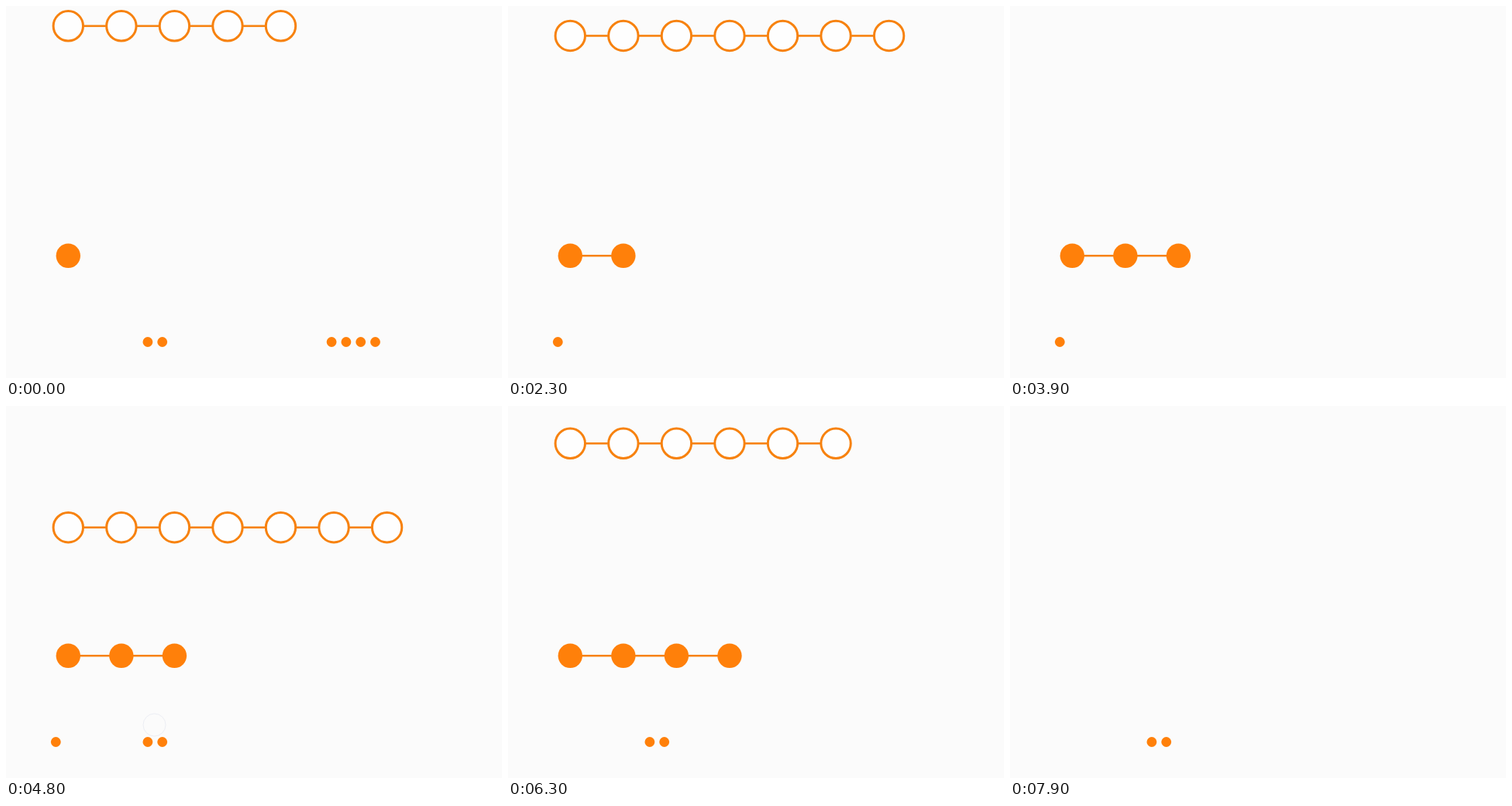
These frames come from a looping animation (640 px wide and 480 px high, 8000 ms). An HTML page with a canvas:

```html
<!DOCTYPE html>
<html lang="en">
<head>
<meta charset="utf-8">
<title>Falling rings</title>
<style>
  html, body { margin: 0; width: 100%; height: 100%; overflow: hidden; background: #fbfbfb; }
  canvas { display: block; }
</style>
</head>
<body>
<canvas id="stage" width="640" height="480"></canvas>
<script>
const ctx = document.getElementById('stage').getContext('2d');
const LOOP = 8000, STEP = 100;
const ORANGE = '#ff800a', RING = '#f7820f', PAPER = '#fbfbfb';
const FLOOR_Y = 322.3, DOT_Y = 433.5, SPEED = 0.2525;
const FLIGHT = 415, FADE = 450;

// Each row passes height y at time t; a shot removes rings from its right end.
const rows = [
  { count: 5, t: 1300, y: 320, land: 1309 },
  { count: 7, t: 3000, y: 215.2, land: 3424, shot: { at: 2700, size: 1 } },
  { count: 7, t: 4800, y: 156.7, land: 5455, shot: { at: 4850, size: 2 } },
  { count: 6, t: 6300, y: 48.3, land: 7385, shot: { at: 6550, size: 2 }, clears: true }
];

const choices = [
  { until: 2100, sizes: [2, 4] },
  { until: 4100, sizes: [1] },
  { until: 6000, sizes: [1, 2] },
  { until: LOOP, sizes: [2] }
];

const clamp = v => Math.max(0, Math.min(1, v));
const mix = (a, b, p) => a + (b - a) * p;
const slotX = i => 80.3 + i * 68.55;
const dotX = (size, i) => 64.3 + (size - 1) * 128 + (i - (size - 1) / 2) * 18.8;

function circle(x, y, r) {
  ctx.beginPath();
  ctx.arc(x, y, r, 0, Math.PI * 2);
}

function disc(x, y, r) {
  circle(x, y, r);
  ctx.fillStyle = ORANGE;
  ctx.fill();
}

function link(i, y, gap) {
  ctx.beginPath();
  ctx.moveTo(slotX(i - 1) + gap, y);
  ctx.lineTo(slotX(i) - gap, y);
  ctx.strokeStyle = RING;
  ctx.lineWidth = 2.6;
  ctx.stroke();
}

function rowY(row, t) {
  if (row === rows[0]) {
    return t < 900 ? mix(25.8, 222, t / 900) : Math.min(FLOOR_Y, mix(222, 320, (t - 900) / 400));
  }
  return Math.min(FLOOR_Y, row.y + (t - row.t) * SPEED);
}

function drawRow(row, t) {
  const y = rowY(row, t);
  const fade = row.clears ? clamp((7700 - t) / 300) : 1 - clamp((t - row.land) / FADE);
  if (y < -22 || fade === 0) return;
  const hit = row.shot && t >= row.shot.at + FLIGHT;
  const count = row.count - (hit ? row.shot.size : 0);
  ctx.globalAlpha = fade;
  for (let i = 0; i < count; i++) {
    if (i) link(i, y, 20);
    circle(slotX(i), y, 19.2);
    ctx.fillStyle = '#fefefe';
    ctx.fill();
    ctx.strokeStyle = RING;
    ctx.lineWidth = 3;
    ctx.stroke();
  }
  ctx.globalAlpha = 1;
}

function drawShot(row, t) {
  if (!row.shot) return;
  const { at, size } = row.shot;
  const p = (t - at) / FLIGHT;
  if (p <= 0 || p >= 1) return;
  for (let i = 0; i < size; i++) {
    const x = mix(dotX(size, i), slotX(row.count - size + i), p);
    disc(x, mix(DOT_Y, rowY(row, t), p ** 0.8), 6.4);
  }
}

// Every missed row adds one disc to the base.
function drawBase(t) {
  const wipe = clamp((7700 - t) / 300);
  for (let i = 0; i < 4; i++) {
    const grown = i ? clamp((t - rows[i - 1].land) / FADE) : 1;
    ctx.globalAlpha = grown * wipe;
    if (i) link(i, FLOOR_Y, 15);
    disc(slotX(i), FLOOR_Y, 15.7);
  }
  ctx.globalAlpha = 1;
}

function drawChoices(t) {
  const { sizes } = choices.find(c => t < c.until);
  for (const size of sizes) {
    for (let i = 0; i < size; i++) disc(dotX(size, i), DOT_Y, 6.4);
  }
}

function drawTap(t) {
  if (t < 4750 || t > 4950) return;
  circle(191.5, 411.5, 14.5);
  ctx.strokeStyle = '#eceef4';
  ctx.lineWidth = 1;
  ctx.stroke();
}

function draw(now) {
  const t = Math.floor((now % LOOP) / STEP) * STEP;
  ctx.fillStyle = PAPER;
  ctx.fillRect(0, 0, 640, 480);
  rows.forEach(row => drawRow(row, t));
  drawBase(t);
  drawTap(t);
  drawChoices(t);
  rows.forEach(row => drawShot(row, t));
}

const start = performance.now();
function frame() {
  draw(performance.now() - start);
  requestAnimationFrame(frame);
}
frame();
</script>
</body>
</html>
```
